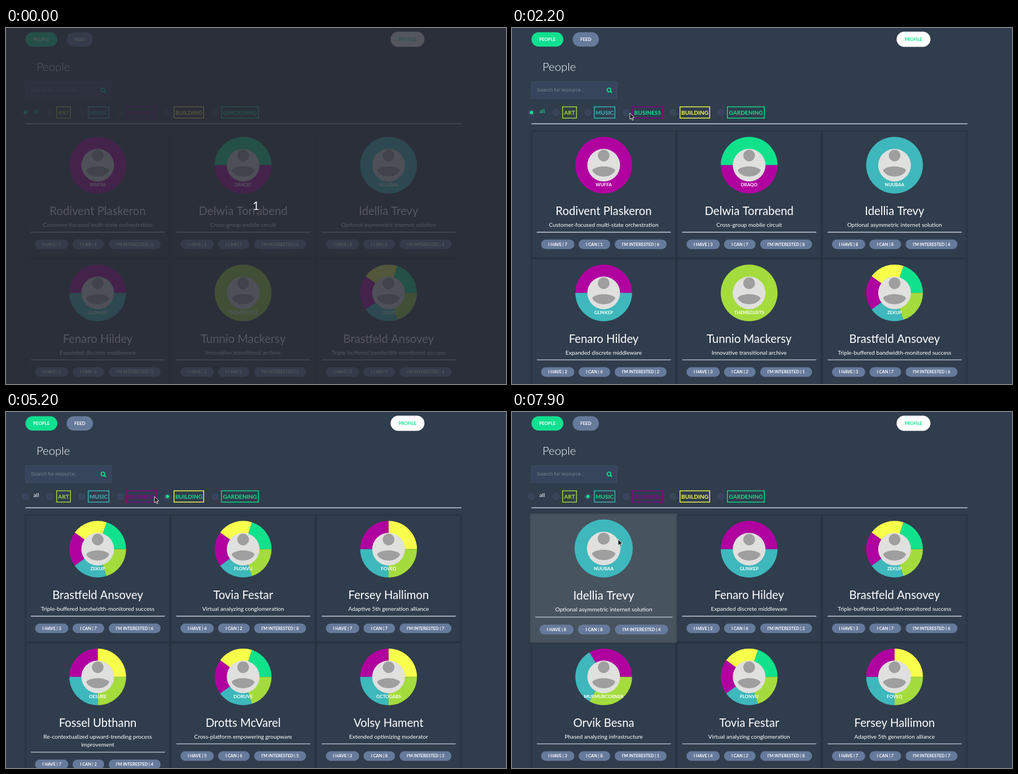
An HTML page with a canvas that plays this animation: 886 by 632 pixels, repeating every 8000 ms.

```html
<!DOCTYPE html>
<html lang="en">
<head>
<meta charset="utf-8">
<title>People</title>
<style>
  html, body { margin: 0; width: 100%; height: 100%; overflow: hidden; background: #303d4d; }
  canvas { display: block; }
</style>
</head>
<body>
<canvas id="stage" width="886" height="632"></canvas>
<script>
const ctx = document.getElementById('stage').getContext('2d');
const LOOP = 8000, STEP = 100;
const BG = '#303d4d', GREEN = '#10e090', SLATE = '#667a9b', FIELD = '#36455c', EDGE = '#3e4e66', RULE = '#c9d0d7';
const RING = { G: '#10e28c', Y: '#f8ff4a', M: '#b000a0', T: '#3eb8bc', L: '#a4dc3d' };

// name, company, ring colours (counterclockwise from the right), counts, tagline lines
const people = [
  ['Rodivent Plaskeron', 'WUFFA', 'M', '716', 'Customer-focused multi-state orchestration'],
  ['Delwia Torrabend', 'DRAQO', 'GM', '378', 'Cross-group mobile circuit'],
  ['Idellia Trevy', 'NUUBAA', 'T', '884', 'Optional asymmetric internet solution'],
  ['Fenaro Hildey', 'GLINKEP', 'MT', '262', 'Expanded discrete middleware'],
  ['Tunnio Mackersy', 'THEMEGUSTS', 'L', '321', 'Innovative transitional archive'],
  ['Brastfeld Ansovey', 'ZEKUP', 'GYMTL', '376', 'Triple-buffered bandwidth-monitored success'],
  ['Orvik Besna', 'MURMURCORNER', 'MTL', '381', 'Phased analyzing infrastructure'],
  ['Tovia Festar', 'PLONVU', 'GYMTL', '428', 'Virtual analyzing conglomeration'],
  ['Fersey Hallimon', 'FOVEQ', 'YMTL', '777', 'Adaptive 5th generation alliance'],
  ['Fossel Ubthann', 'OESURE', 'YMTL', '724', 'Re-contextualized upward-trending process\nimprovement'],
  ['Drotts McVarel', 'DORUVE', 'GYMTL', '565', 'Cross-platform empowering groupware'],
  ['Volsy Hament', 'OCTOGABS', 'YMTL', '383', 'Extended optimizing moderator']
].map(([name, company, colors, counts, tagline]) => ({ name, company, colors, counts, tagline }));

// radio x, label, outer left and right, colour, time checked and unchecked
const filters = [
  [34.5, 'all', 48.5, 59, '#fff', -500, 2500],
  [78, 'ART', 89, 115, RING.L],
  [134.5, 'MUSIC', 145, 183, RING.T, 6600, LOOP],
  [202.5, 'BUSINESS', 213, 267.5, '#8b008b', 2200, 4600],
  [286, 'BUILDING', 297, 351, RING.Y, 4300, 6500],
  [370.5, 'GARDENING', 381, 448, RING.G]
];

const views = [[0, ''], [2550, 'M'], [4501, 'Y'], [6500, 'T']]
  .map(([at, key]) => ({ at, list: people.filter(p => p.colors.includes(key)) }));
const MOVE = 300;

const path = [
  [1100, 6, 562], [1700, 209, 151], [3000, 209, 151], [3300, 338, 156], [3400, 338, 156],
  [4000, 294, 151], [4800, 294, 151], [5000, 320, 152], [5200, 263, 150], [5500, 200, 129],
  [5900, 139, 156], [7500, 139, 156], [7900, 188, 226]
];

const clamp = v => Math.min(1, Math.max(0, v));
const mix = (a, b, k) => a + (b - a) * k;
const ease = k => k * k * (3 - 2 * k);

function text(str, x, y, size, color = '#fff', weight = 400, align = 'center', family = 'Lato, sans-serif') {
  ctx.font = `${weight} ${size}px ${family}`;
  ctx.textAlign = align;
  ctx.fillStyle = color;
  ctx.fillText(str, x, y);
}
function pill(x1, x2, y, h, fill, label, size, color) {
  ctx.fillStyle = fill;
  ctx.beginPath();
  ctx.roundRect(x1, y, x2 - x1, h, h / 2);
  ctx.fill();
  text(label, (x1 + x2) / 2, y + h / 2 + size * .36, size, color, 700);
}
function disc(x, y, r, fill) {
  ctx.fillStyle = fill;
  ctx.beginPath();
  ctx.arc(x, y, r, 0, 7);
  ctx.fill();
}
function line(x1, y1, x2, y2, color, width) {
  ctx.strokeStyle = color;
  ctx.lineWidth = width;
  ctx.beginPath();
  ctx.moveTo(x1, y1);
  ctx.lineTo(x2, y2);
  ctx.stroke();
}
function box(x, y, w, h, color, width) {
  ctx.strokeStyle = color;
  ctx.lineWidth = width;
  ctx.strokeRect(x, y, w, h);
}

function drawAvatar(colors) {
  const slice = Math.PI * 2 / colors.length;
  [...colors].forEach((c, i) => {
    ctx.fillStyle = RING[c];
    ctx.beginPath();
    ctx.moveTo(0, 0);
    ctx.arc(0, 0, 50.3, -i * slice, -(i + 1) * slice, true);
    ctx.fill();
  });
  disc(0, 0, 29, '#e0e0de');
  disc(0, -17, 10.4, '#9f9f9f');
  ctx.beginPath();
  ctx.moveTo(-20.5, 9);
  ctx.bezierCurveTo(-14, 0, 14, 0, 20.5, 9);
  ctx.bezierCurveTo(14, 24, -14, 24, -20.5, 9);
  ctx.fill();
}

// Card coordinates are relative to the centre of its ring.
function drawCard(p, x, y, hover) {
  ctx.save();
  ctx.translate(x, y);
  if (hover) {
    const s = 1 + .024 * hover;
    ctx.translate(0, 52.5);
    ctx.scale(s, s);
    ctx.translate(0, -52.5);
    ctx.fillStyle = `rgba(72,83,96,${hover})`;
    ctx.fillRect(-128, -61, 256, 225.5);
  }
  box(-128, -60.5, 256, 225, 'rgba(0,0,0,.05)', 4);
  box(-128, -60.5, 256, 225, 'rgba(0,0,0,.07)', 2);
  drawAvatar(p.colors);
  text(p.company, 0, 37.4, 8, '#fff', 700);
  text(p.name, 0, 88.5, 20.3);
  const lines = p.tagline.split('\n');
  lines.forEach((s, i) => text(s, 0, 109.5 + i * 14.7, 10.1));
  const drop = (lines.length - 1) * 14.7;
  line(-118.5, 119 + drop, 119, 119 + drop, RULE, 1.3);
  const [have, can, want] = p.counts;
  pill(-111, -52, 132 + drop, 17, SLATE, `I HAVE | ${have}`, 7.4, '#fff');
  pill(-44.5, 11.5, 132 + drop, 17, SLATE, `I CAN | ${can}`, 7.4, '#fff');
  pill(19.5, 111.5, 132 + drop, 17, SLATE, `I'M INTERESTED | ${want}`, 7.4, '#fff');
  ctx.restore();
}

function drawCards(t) {
  const n = views.findLastIndex(v => t >= v.at);
  const now = views[n].list, before = views[Math.max(0, n - 1)].list;
  const k = n ? clamp((t - views[n].at) / MOVE) : 1;
  const slot = i => [162.5 + i % 3 * 257.7, 243.5 + Math.floor(i / 3) * 226.7];
  const hover = clamp((t - 7650) / 250);
  for (const p of people) {
    const to = now.indexOf(p), from = before.indexOf(p);
    if (to < 0 && (from < 0 || k === 1)) continue;
    const a = slot(from < 0 ? to : from), b = slot(to < 0 ? from : to);
    ctx.globalAlpha = to < 0 ? 1 - k : 1;
    drawCard(p, mix(a[0], b[0], ease(k)), mix(a[1], b[1], ease(k)), to === 0 ? hover : 0);
  }
  ctx.globalAlpha = 1;
}

function drawHeader(t) {
  pill(34.5, 91, 7.5, 25.5, GREEN, 'PEOPLE', 7.9, '#fff');
  pill(107.5, 154, 7.5, 25.5, SLATE, 'FEED', 7.9, '#fff');
  pill(681.5, 741.5, 6.5, 27, '#fff', 'PROFILE', 7.9, GREEN);
  text('People', 54, 75.5, 20.3, '#fff', 300, 'left');

  ctx.fillStyle = FIELD;
  ctx.fillRect(34, 95, 152.5, 30.5);
  box(34.5, 95.5, 151.5, 29.5, EDGE, 1);
  text('Search for resource..', 44, 113, 8.9, '#75808c', 400, 'left', '"Liberation Sans", Arial, sans-serif');
  ctx.strokeStyle = GREEN;
  ctx.lineWidth = 1.8;
  ctx.beginPath();
  ctx.arc(171.8, 110, 3.3, 0, 7);
  ctx.stroke();
  line(174.2, 112.4, 177, 115.3, GREEN, 2);

  for (const [x, label, left, right, color, on = LOOP, off = 0] of filters) {
    const checked = t >= on && t < off;
    disc(x, 150, 6, EDGE);
    disc(x, 150, 5, FIELD);
    if (checked) {
      ctx.globalAlpha = clamp((t - on) / 100);
      disc(x, 150, 3, GREEN);
      ctx.globalAlpha = 1;
    }
    const ink = checked ? GREEN : color;
    if (label === 'all') {
      text(label, left, 150.5, 10.1, ink, 400, 'left');
    } else {
      box(left + .7, 139.9, right - left - 1.4, 20, color, 1.4);
      text(label, (left + right) / 2, 153.7, 10.1, ink, 700);
    }
  }
  line(34.5, 170, 807, 170, RULE, 1.4);
}

function drawCursor(t) {
  if (t < path[0][0]) return;
  const i = path.findLastIndex(k => t >= k[0]);
  const a = path[i], b = path[i + 1] || a;
  const k = ease(clamp((t - a[0]) / (b[0] - a[0] || 1)));
  const x = mix(a[1], b[1], k), y = mix(a[2], b[2], k);
  ctx.beginPath();
  for (const [dx, dy] of [[0, 0], [0, 11], [2.5, 8.8], [4.2, 12.8], [6, 12], [4.3, 8.2], [7.7, 8]]) ctx.lineTo(x + dx, y + dy);
  ctx.closePath();
  ctx.fillStyle = '#111';
  ctx.strokeStyle = '#e8eaec';
  ctx.lineWidth = 1;
  ctx.fill();
  ctx.stroke();
}

function drawCountdown() {
  ctx.fillStyle = 'rgba(42,44,54,.8)';
  ctx.fillRect(0, 0, 886, 632);
  text('1', 443, 323, 20.3, '#eceded');
}

function frame() {
  const t = Math.floor(performance.now() % LOOP / STEP) * STEP;
  ctx.fillStyle = BG;
  ctx.fillRect(0, 0, 886, 632);
  drawHeader(t);
  drawCards(t);
  drawCursor(t);
  if (t < 500) drawCountdown();
  requestAnimationFrame(frame);
}
frame();
</script>
</body>
</html>
```
